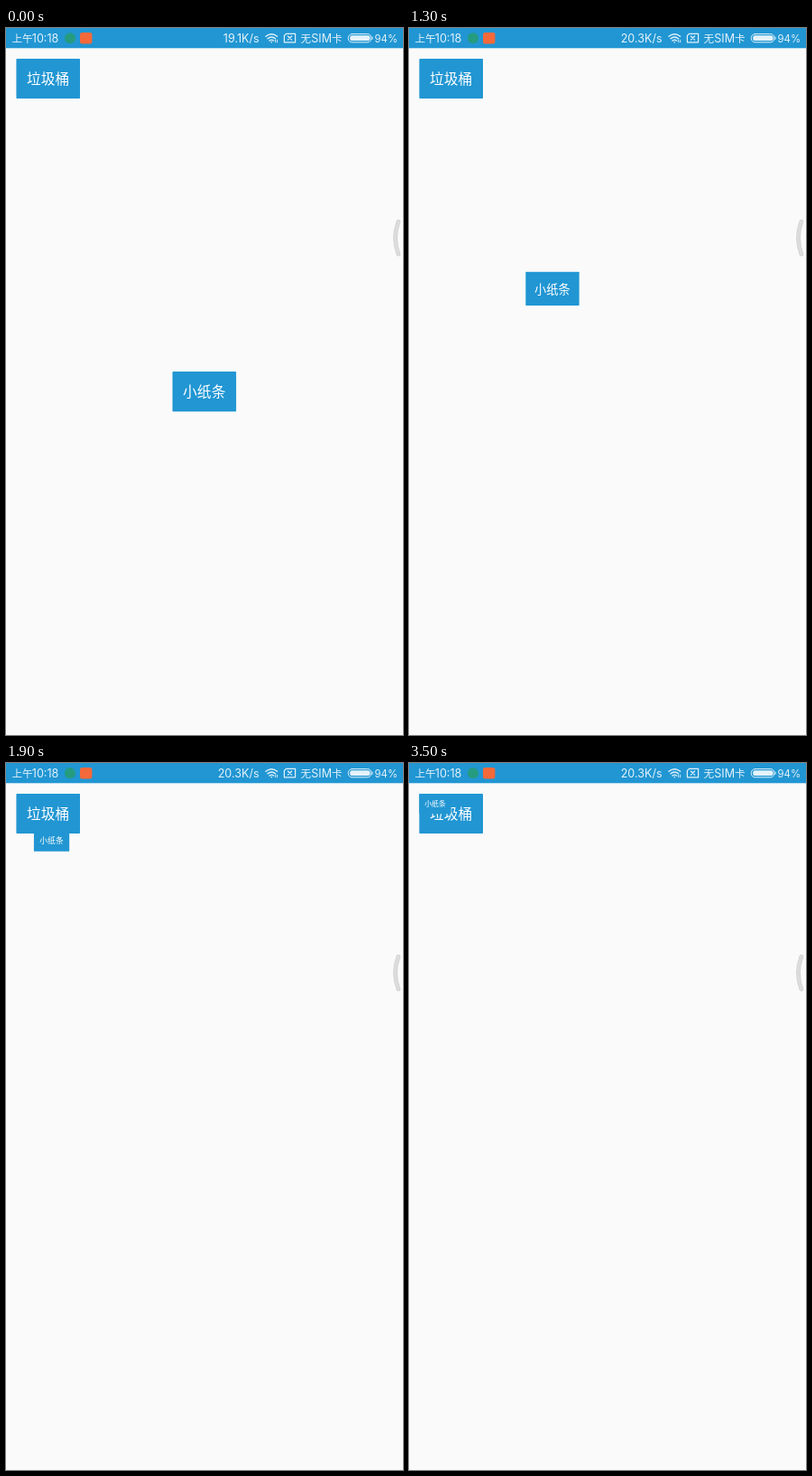
Write an HTML page that moves like this. It is 440 by 782 pixels and loops after 3.6 s.

```html
<!DOCTYPE html>
<html lang="zh-CN">
<head>
<meta charset="utf-8">
<title>小纸条</title>
<style>
  html, body { margin: 0; width: 100%; height: 100%; overflow: hidden; background: #fafafa; }
  svg { display: block; width: 440px; height: 782px; }
  .blue { fill: #2196d3; }
  .label { font: 350 15.7px "Noto Sans CJK SC", "Noto Sans CJK", sans-serif; letter-spacing: .15px; fill: #fff; }
  .status { font: 12.6px Inter, "Noto Sans CJK SC", "Noto Sans CJK", sans-serif; fill: #e4f2fa; }
  .cjk { font-size: 11.6px; }
  .line { fill: none; stroke: #e4f2fa; stroke-width: 1.2; stroke-linecap: round; }
</style>
</head>
<body>
<svg viewBox="0 0 440 782">
  <rect width="440" height="782" fill="#fafafa"/>

  <!-- status bar -->
  <rect class="blue" width="440" height="22.3"/>
  <g class="status">
    <text class="cjk" x="6.4" y="16">上午</text>
    <text x="28.8" y="16">10:18</text>
    <text id="speed" x="280.7" y="16" text-anchor="end">19.1K/s</text>
    <text class="cjk" x="326.6" y="16">无<tspan font-size="12.6">SIM</tspan>卡</text>
    <text x="434" y="16" text-anchor="end" font-size="11.3">94%</text>
  </g>
  <circle cx="71" cy="11.3" r="6" fill="#259b80"/>
  <rect x="82" y="5" width="13.4" height="12.6" rx="2.5" fill="#f4693a"/>
  <g class="line">
    <path d="M288 9.3Q294.3 4.2 300.6 9.3M290 11.7Q294.3 8.2 298.6 11.7M292 14Q294.3 12.2 296.6 14" stroke-width="1.4"/>
    <path d="M294.3 15.6v.2" stroke-width="1.6"/>
    <path d="M298.6 13.2v2.6M300.6 13.2v2.6" stroke-width=".9"/>
    <path d="M310.5 6.4H320.6V15.8H308.4V8.5Z" stroke-linejoin="round"/>
    <path d="M312.4 9l4.2 4.2M316.6 9l-4.2 4.2"/>
    <rect x="379.3" y="6.6" width="25.6" height="9.2" rx="4.2" stroke-width="1"/>
    <path d="M406 10v2.4" stroke-width="1"/>
  </g>
  <rect x="381.2" y="8.3" width="22.4" height="5.8" rx="2.6" fill="#e4f2fa"/>

  <!-- edge handle -->
  <g fill="none" stroke-linecap="round">
    <path d="M434.8 214.3Q428.2 232 434.8 250" stroke="#d0d0d0" stroke-width="4.8"/>
    <path d="M434.8 214.3Q428.2 232 434.8 250" stroke="#dcdcdc" stroke-width="3.4"/>
  </g>

  <g transform="translate(11.4 34)">
    <rect class="blue" width="70.6" height="44.1" rx=".8"/>
    <text class="label" x="11.5" y="28.4">垃圾桶</text>
  </g>
  <g id="note" transform="translate(184.5 380)">
    <rect class="blue" width="70.6" height="44.3" rx=".8"/>
    <text class="label" x="11.5" y="28.4">小纸条</text>
  </g>
</svg>
<script>
  const LOOP = 3600, STEP = 100, START = 727, DURATION = 1500, SPEED_CHANGE = 800;
  const note = document.getElementById('note');
  const speed = document.getElementById('speed');
  const mix = (a, b, p) => a + (b - a) * p;
  const ease = t => (1 - Math.cos(Math.PI * t)) / 2;

  function draw(now) {
    const time = Math.floor((now % LOOP) / STEP) * STEP;
    const p = ease(Math.min(1, Math.max(0, (time - START) / DURATION)));
    note.setAttribute('transform',
      `translate(${mix(184.5, 11.4, p)} ${mix(380, 34, p)}) scale(${mix(1, 0.5, p)})`);
    speed.textContent = time < SPEED_CHANGE ? '19.1K/s' : '20.3K/s';
  }

  function tick() {
    draw(performance.now());
    requestAnimationFrame(tick);
  }
  tick();
</script>
</body>
</html>
```
